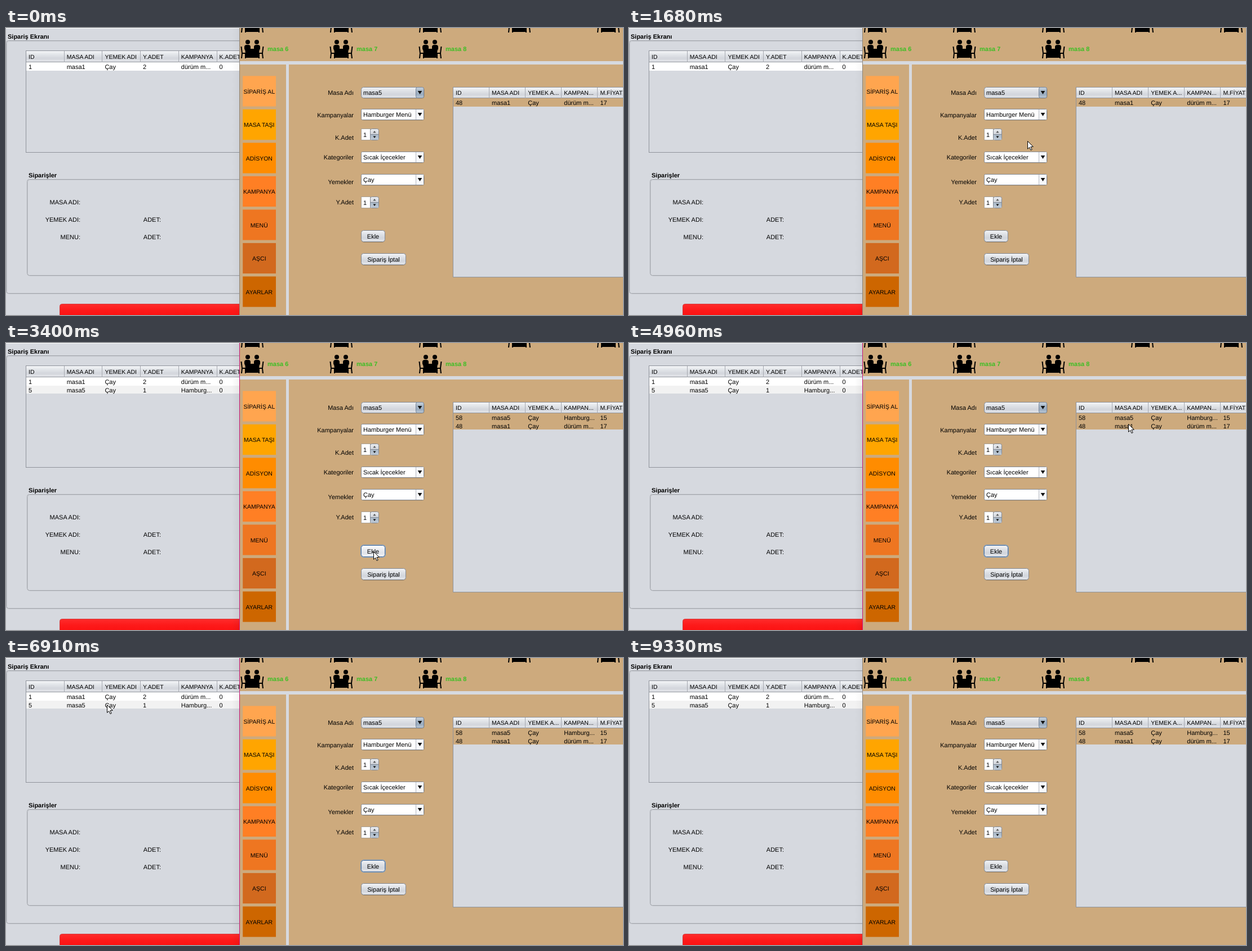
Animation of 1095x511 px, one loop 9.48 s. Source, as an HTML page with a canvas:

```html
<!DOCTYPE html>
<html lang="tr">
<head>
<meta charset="utf-8">
<title>Sipariş Ekranı</title>
<style>
html, body { margin: 0; width: 100%; height: 100%; overflow: hidden; background: #d6d9df; }
canvas { display: block; }
</style>
</head>
<body>
<canvas id="stage" width="1095" height="511"></canvas>
<script>
const ctx = document.getElementById('stage').getContext('2d');
ctx.textRendering = 'geometricPrecision';
const LOOP = 9480;
const GREY = '#d6d9df', TAN = '#cdaa7d', LINE = '#8f939b', EDGE = '#838993';
const FACE = '"Liberation Sans", Arial, sans-serif';
const CAPS = /^[A-ZÇĞİÖŞÜ. ]+$/;

// Pointer moves: first change, last change, number of steps, end point.
const START = [985, 493];
const MOVES = [
  [530, 530, 1, 985, 493], [607, 840, 4, 856, 392],
  [1070, 1680, 9, 707, 201], [1780, 2000, 4, 664, 285],
  [2090, 2470, 6, 652, 372], [2870, 2870, 1, 652, 370], [2950, 2950, 1, 652, 371],
  [3810, 4350, 8, 895, 127], [4740, 4960, 4, 886, 144],
  [5360, 5670, 5, 320, 85], [5750, 5750, 1, 282, 98],
  [6060, 6470, 6, 174, 83], [6910, 6910, 1, 179, 83],
  [6990, 7370, 6, 444, 193], [7690, 7920, 4, 914, 428],
  [8160, 8160, 1, 963, 467]
];
const POINTER_ON = 530, POINTER_OFF = 8250;
const FOCUS_ON = 3100, FOCUS_OFF = 9330, ROW_ADDED = 3400;

function pointerAt(t) {
  if (t < POINTER_ON || t >= POINTER_OFF) return null;
  let [x, y] = START;
  for (const [from, to, steps, endX, endY] of MOVES) {
    if (t < from) break;
    const gap = steps > 1 ? (to - from) / (steps - 1) : 1;
    const k = Math.min(1, (Math.floor((t - from) / gap + 1e-6) + 1) / steps);
    x += (endX - x) * k;
    y += (endY - y) * k;
  }
  return { x: Math.round(x), y: Math.round(y) };
}

function rect(x, y, w, h, fill) {
  ctx.fillStyle = fill;
  ctx.fillRect(x, y, w, h);
}

function text(s, x, y, align = 'left', color = '#000', weight = '') {
  ctx.font = `${weight} ${CAPS.test(s) ? 10.5 : 11}px ${FACE}`;
  ctx.textAlign = align;
  ctx.fillStyle = color;
  ctx.fillText(s, x, y);
}

function shade(y, h, ...colors) {
  const g = ctx.createLinearGradient(0, y, 0, y + h);
  colors.forEach((c, i) => g.addColorStop(i / (colors.length - 1), c));
  return g;
}

function roundBox(x, y, w, h, r, fill, stroke, width = 1) {
  ctx.beginPath();
  ctx.roundRect(x + 0.5, y + 0.5, w - 1, h - 1, r);
  if (fill) { ctx.fillStyle = fill; ctx.fill(); }
  if (stroke) { ctx.strokeStyle = stroke; ctx.lineWidth = width; ctx.stroke(); }
}

function polygon(points, fill, stroke) {
  ctx.beginPath();
  points.forEach(([x, y]) => ctx.lineTo(x, y));
  ctx.closePath();
  ctx.fillStyle = fill;
  ctx.fill();
  if (stroke) { ctx.strokeStyle = stroke; ctx.lineWidth = 1; ctx.stroke(); }
}

function stroke(points, width) {
  ctx.beginPath();
  points.forEach(([x, y]) => ctx.lineTo(x, y));
  ctx.strokeStyle = '#000';
  ctx.lineWidth = width;
  ctx.stroke();
}

const inside = (p, x, y, w, h) => p && p.x >= x && p.x < x + w && p.y >= y && p.y < y + h;

function triangle(x, y, half, h, color = '#111') {
  polygon([[x - half, y], [x + half, y], [x, y + h]], color);
}

function group(x, y, w, h) {
  roundBox(x + 1, y + 1, w, h, 4, null, '#c3c6cc');
  roundBox(x, y, w, h, 4, null, '#a3a6ac');
}

function table(x, y, w, h, headH, pitch, heads, rows, colors) {
  rect(x, y, w, h, GREY);
  rows.forEach((row, r) => {
    const top = Math.round(y + headH + r * 14.5);
    rect(x, top, w, Math.round(y + headH + (r + 1) * 14.5) - top, colors[r]);
    row.forEach((s, c) => text(s, x + 5 + c * pitch, top + 12));
  });
  rect(x, y, w, headH, shade(y, headH, '#f7f8fa', '#e3e6ea', '#d3d6dc', '#e6e8ec'));
  rect(x, y + headH - 1, w, 1, LINE);
  heads.forEach((s, c) => {
    text(s, x + 5 + c * pitch, y + headH - 6);
    if (c) rect(Math.round(x + c * pitch), y, 1, headH, '#a6a9b0');
  });
  ctx.strokeStyle = LINE;
  ctx.lineWidth = 1;
  ctx.strokeRect(x + 0.5, y + 0.5, w - 1, h - 1);
}

function orders(added) {
  rect(0, 0, 415, 511, GREY);
  rect(0, 0, 415, 1, '#fff');
  text('Sipariş Ekranı', 3, 19, 'left', '#000', 'bold');
  group(0, 22, 600, 451);
  const rows = [['1', 'masa1', 'Çay', '2', 'dürüm m...', '0']];
  if (added) rows.push(['5', 'masa5', 'Çay', '1', 'Hamburg...', '0']);
  table(35, 40, 440, 182, 21, 67.7,
    ['ID', 'MASA ADI', 'YEMEK ADI', 'Y.ADET', 'KAMPANYA', 'K.ADET'], rows, ['#fff', '#f2f2f2']);
  text('Siparişler', 40, 266, 'left', '#000', 'bold');
  group(37, 269, 600, 172);
  text('MASA ADI:', 132, 314, 'right');
  text('YEMEK ADI:', 132, 345, 'right');
  text('MENU:', 132, 376, 'right');
  text('ADET:', 275, 345, 'right');
  text('ADET:', 275, 376, 'right');
  roundBox(95, 491, 500, 40, 4, shade(491, 24, '#ff2c2c', '#fd1919', '#fb1010'), '#d23c3c');
}

// Two guests behind a covered table, a chair at each end.
function diners(x, y) {
  for (const side of [1, -1]) {
    ctx.save();
    ctx.translate(side > 0 ? x : x + 42, y);
    ctx.scale(side, 1);
    ctx.fillStyle = '#000';
    ctx.beginPath();
    ctx.arc(13, 5, 4, 0, Math.PI * 2);
    ctx.fill();
    ctx.beginPath();
    ctx.roundRect(7, 10, 11, 10, 4);
    ctx.fill();
    polygon([[8, 17], [21.5, 17], [21.5, 33], [10, 33]], '#000');
    stroke([[1.5, 13], [3, 25], [2, 34]], 2);
    stroke([[2, 25], [9, 25], [9, 34]], 2);
    ctx.restore();
  }
}

function combo(label, y, pointer, plain) {
  const hover = inside(pointer, 630, y, 112, 20);
  roundBox(631, y + 1, 112, 20, 4, null, 'rgba(70,60,50,.15)');
  roundBox(630, y, 112, 20, plain ? 4 : 2,
    plain ? shade(y, 20, '#f2f3f5', '#dfe2e7', '#d2d5dc', '#e4e7eb') : '#fff', EDGE);
  if (plain) {
    roundBox(727, y, 15, 20, 3, shade(y, 20, '#cfd8e1', '#a8b8c8', '#9aacbf', '#c0ccd8'), '#75849a');
  } else {
    rect(728, y + 1, 13, 18, hover ? '#e4eaf2' : '#f7f8fa');
    rect(727, y + 1, 1, 18, '#b5b9c0');
  }
  triangle(734.5, y + 7, 3.8, 6);
  text(label, 634, y + 14);
}

function spinner(y, pointer) {
  rect(630, y, 16, 21, '#fff');
  ctx.strokeStyle = '#a89f92';
  ctx.lineWidth = 1;
  ctx.strokeRect(630.5, y + 0.5, 16, 20);
  const up = inside(pointer, 646, y, 16, 11), down = inside(pointer, 646, y + 11, 16, 10);
  roundBox(646, y, 16, 21, 3, up ? '#f1f3f6' : shade(y, 11, '#eceef1', '#cfd3da'), EDGE);
  rect(647, y + 11, 14, 9, down ? '#c3d0dd' : shade(y + 11, 9, '#a9b8c7', '#bfcad6'));
  rect(646, y + 10, 16, 1, EDGE);
  triangle(654, y + 7.5, 2.5, -3.5, '#555');
  triangle(654, y + 13.5, 2.5, 3.5);
  text('1', 634, y + 15);
}

function button(label, x, y, w, h, pointer, focused) {
  const hover = inside(pointer, x, y, w, h);
  if (focused) roundBox(x - 0.5, y - 0.5, w + 1, h + 1, 5, null, '#7fa0c3', 2);
  else roundBox(x, y + 1, w, h, 5, null, 'rgba(60,50,40,.25)');
  const fill = hover ? shade(y, h, '#ffffff', '#eceef2', '#e0e3e9', '#f7f9fb')
                     : shade(y, h, '#f6f7f9', '#dfe2e7', '#d1d5dc', '#e9ebef');
  roundBox(x, y, w, h, 4, fill, focused ? '#56749a' : EDGE);
  text(label, x + w / 2, y + 15, 'center');
}

function register(pointer, focused, added) {
  // Window shadow falls on the screen behind it.
  const g = ctx.createLinearGradient(400, 0, 415, 0);
  g.addColorStop(0, 'rgba(0,0,0,0)');
  g.addColorStop(1, focused ? 'rgba(0,0,0,.05)' : 'rgba(0,0,0,.03)');
  rect(400, 0, 15, 511, g);

  rect(415, 0, 680, 511, TAN);
  for (let i = 0; i < 5; i++) {
    diners(416 + i * 158, -26);
    if (i < 3) {
      diners(416 + i * 158, 20);
      text('masa ' + (6 + i), 464 + i * 158, 41, 'left', '#3cbf24', 'bold');
    }
  }
  rect(415, 59, 680, 6, GREY);
  rect(497, 65, 5, 446, GREY);
  rect(414, 0, 1, 511, focused ? '#c4177c' : '#8d8478');

  const menu = [
    ['SİPARİŞ AL', '#ffa54f'], ['MASA TAŞI', '#ffa500'], ['ADİSYON', '#ff8c00'],
    ['KAMPANYA', '#ff7f24'], ['MENÜ', '#ee7621'], ['AŞCI', '#d2691e'], ['AYARLAR', '#cd6600']
  ];
  menu.forEach(([label, color], i) => {
    const y = 85.4 + i * 59.5;
    rect(420.2, y, 58.8, 54.2, color);
    text(label, 449.3, Math.round(y + 31.2), 'center');
  });

  const labels = [['Masa Adı', 119], ['Kampanyalar', 159], ['K.Adet', 199],
    ['Kategoriler', 234], ['Yemekler', 278], ['Y.Adet', 314]];
  labels.forEach(([s, y]) => text(s, 617, y, 'right'));
  combo('masa5', 105, pointer, true);
  combo('Hamburger Menü', 144, pointer);
  spinner(179, pointer);
  combo('Sıcak İçecekler', 220, pointer);
  combo('Çay', 260, pointer);
  spinner(300, pointer);
  button('Ekle', 630, 360, 43, 21, pointer, focused);
  button('Sipariş İptal', 630, 401, 80, 21, pointer, false);

  const rows = [['48', 'masa1', 'Çay', 'dürüm m...', '17']];
  if (added) rows.unshift(['58', 'masa5', 'Çay', 'Hamburg...', '15']);
  table(793, 105, 340, 339, 20, 64.1,
    ['ID', 'MASA ADI', 'YEMEK A...', 'KAMPAN...', 'M.FİYAT'], rows, [TAN, TAN]);
}

function arrow({ x, y }) {
  ctx.save();
  ctx.translate(x + 0.5, y + 0.5);
  polygon([[0, 0], [0, 13.8], [3.2, 10.9], [5.5, 16], [7.7, 15], [5.4, 10.1], [9.8, 9.8]], '#fff', '#000');
  ctx.restore();
}

function draw(t) {
  const pointer = pointerAt(t);
  const focused = t >= FOCUS_ON && t < FOCUS_OFF;
  const added = t >= ROW_ADDED;
  orders(added);
  register(pointer, focused, added);
  if (pointer) arrow(pointer);
}

const begin = performance.now();
function tick() {
  draw((performance.now() - begin) % LOOP);
  requestAnimationFrame(tick);
}
tick();
</script>
</body>
</html>
```
